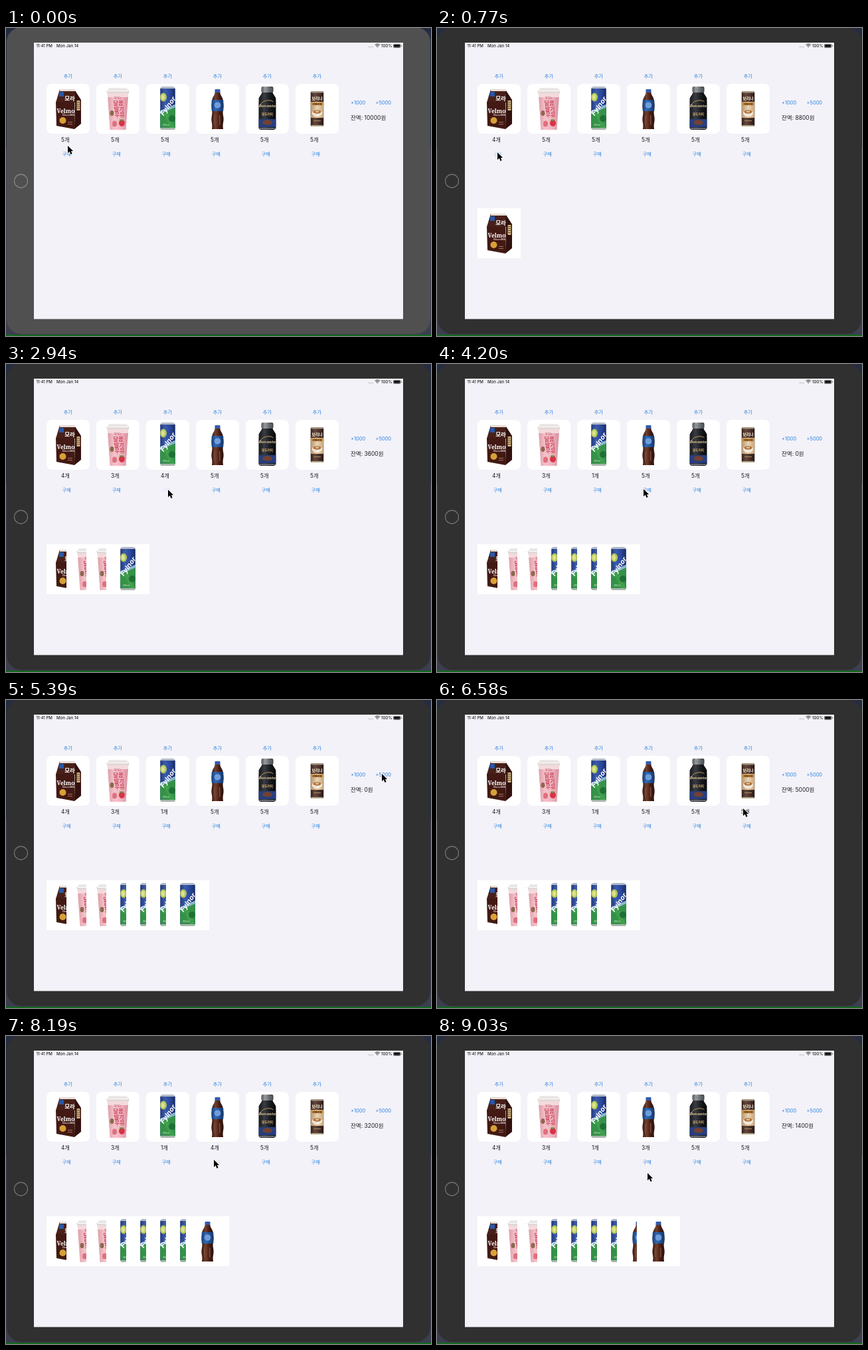
Write an HTML page with a canvas that moves like this. It is 640 by 463 pixels and loops after 9.1 s.

```html
<!DOCTYPE html>
<html lang="ko">
<head>
<meta charset="utf-8">
<title>자판기</title>
<style>
html, body { margin: 0; width: 100%; height: 100%; overflow: hidden; background: #242c42; }
canvas { display: block; width: 100vw; height: 100vh; }
</style>
</head>
<body>
<canvas id="stage"></canvas>
<script>
const W = 640, H = 463, LOOP = 9100, STEP = 70;
const canvas = document.getElementById('stage');
const ctx = canvas.getContext('2d');
const ratio = window.devicePixelRatio || 1;
canvas.width = Math.round(W * ratio);
canvas.height = Math.round(H * ratio);

const SANS = "Inter, 'Noto Sans CJK KR', 'Noto Sans CJK', sans-serif";
const SERIF = "'Noto Serif', serif";
const LINK = '#2b83e2', INK = '#1c1c1e';
const CARD_W = 65, CARD_H = 75, LEFT = 61, MID = CARD_W / 2;
const TAP_DELAY = 280, TAP_GAP = 350, FOCUS = 420, DEPOSIT = 5000;

// Where the pointer goes, when it arrives and what it taps there
const visits = [
  { at: 0, x: 93, y: 177 },
  { at: 350, x: 91, y: 187, item: 0, taps: 1 },
  { at: 1120, x: 162, y: 187, item: 1, taps: 2 },
  { at: 2380, x: 244, y: 189, item: 2, taps: 4 },
  { at: 4200, x: 311, y: 188 },
  { at: 5390, x: 566, y: 111, deposit: true, taps: 1 },
  { at: 6580, x: 461, y: 163 },
  { at: 7840, x: 313, y: 186, item: 3, taps: 2 },
  { at: 9030, x: 317, y: 206 }
];

const taps = visits.flatMap(v => Array.from({ length: v.taps || 0 }, (_, n) => (
  { at: v.at + TAP_DELAY + n * TAP_GAP, item: v.item, deposit: v.deposit }
)));

const smooth = p => {
  const q = Math.max(0, Math.min(1, p));
  return q * q * (3 - 2 * q);
};

function fillPath(fill) {
  ctx.closePath();
  ctx.fillStyle = fill;
  ctx.fill();
}

function poly(points, fill) {
  ctx.beginPath();
  points.forEach(([x, y]) => ctx.lineTo(x, y));
  fillPath(fill);
}

function box(x, y, w, h, fill, r = 0) {
  ctx.beginPath();
  ctx.roundRect(x, y, w, h, r);
  fillPath(fill);
}

// Box centred on the card
const band = (y, w, h, fill, r) => box(MID - w / 2, y, w, h, fill, r);

function oval(x, y, rx, ry, fill) {
  ctx.beginPath();
  ctx.ellipse(x, y, rx, ry, 0, 0, Math.PI * 2);
  fillPath(fill);
}

// Upright symmetric shape whose half width depends on the height
function turned(top, bottom, half, fill) {
  ctx.beginPath();
  for (let y = top; y <= bottom; y++) ctx.lineTo(MID + half(y), y);
  for (let y = bottom; y >= top; y--) ctx.lineTo(MID - half(y), y);
  fillPath(fill);
}

function text(s, x, y, size, fill, style = '', family = SANS, align = 'left') {
  ctx.font = `${style} ${size}px ${family}`;
  ctx.textAlign = align;
  ctx.fillStyle = fill;
  ctx.fillText(s, x, y);
}

const label = (s, y, size, fill, style = 'bold', family = SANS, x = MID) =>
  text(s, x, y, size, fill, style, family, 'center');

// Horizontal gradient that rounds a shape of the given width
function shade(w, ...colors) {
  const g = ctx.createLinearGradient(MID - w / 2, 0, MID + w / 2, 0);
  colors.forEach((c, i) => g.addColorStop(i / (colors.length - 1), c));
  return g;
}

function carton() {
  poly([[20, 8], [43, 9], [43, 28], [14, 28]], '#48201b');
  poly([[43, 10], [52, 24], [52, 60], [42, 68]], '#32110e');
  poly([[14, 27], [42, 28], [42, 68], [15, 63]], '#431913');
  box(20, 8, 23, 3, '#e6ded9');
  box(45.5, 25, 5, 15, '#cdb47c');
  for (let y = 27; y < 39; y += 3) box(46, y, 4, 1, '#67472f');
  box(19, 12, 7, 7, '#2857a5');
  label('모라', 25, 8.5, '#fff', 'bold', SANS, 35);
  label('Velmo', 43.5, 8.5, '#fff', 'bold', SERIF, 29);
  label('Choco Milk', 48, 3.4, '#eadfd5', 'bold', SANS, 33);
  oval(24.5, 55, 5, 5, '#d8a136');
  for (let y = 57; y < 62; y += 3) box(32, y, 7, 1, '#a0715a');
}

function cup() {
  turned(13, 69, y => 15.8 - (y - 13) * 0.068, shade(31, '#dd9eaa', '#f5c3ca', '#f0b3bd', '#d58f9e'));
  turned(13, 20, y => 15.8 - (y - 13) * 0.068, '#f3dadd');
  band(6, 29, 6, '#ebe8e8', 2);
  band(9.5, 34, 4, '#d9d4d4', 2);
  band(10, 31, 1.5, '#fbfafa');
  label('맛있는', 23, 4, '#b4475b', '');
  ['달콤', '딸기', '우유'].forEach((s, i) => label(s, 32 + i * 8.5, 8.2, '#c84660', 'bold', SANS, 33 + i));
  oval(23.5, 44, 3, 4, '#8b6a50');
  oval(38.5, 59, 4.5, 5, '#d53549');
  oval(38, 54.5, 3, 1.2, '#64903e');
  oval(27.5, 60, 3.5, 4.5, '#e0707e');
}

function sodaCan() {
  ctx.save();
  ctx.beginPath();
  ctx.roundRect(MID - 11.3, 4.5, 22.6, 64.5, 4);
  ctx.clip();
  band(4, 23, 66, shade(23, '#24397a', '#3c5cae', '#2b479b', '#172b64'));
  ctx.save();
  ctx.translate(MID, 39);
  ctx.rotate(-0.42);
  box(-20, 0, 40, 50, '#349247');
  box(-20, -3, 40, 4, '#8fb6cd');
  box(-8, 2, 7, 45, '#58b45855');
  ctx.restore();
  oval(26, 20, 5, 6.5, '#b3c65a');
  oval(25.5, 20, 2.6, 4, '#dde28c');
  oval(39, 52, 5, 5, '#1f6f36');
  band(4, 23, 3, '#b9bec6');
  band(66, 23, 3, '#a9b7ac');
  ctx.translate(MID, 33);
  ctx.rotate(-0.95);
  label('Fylnor', 4, 10.5, '#fff', 'italic bold', SANS, 0);
  ctx.restore();
  label('355ml', 63, 3.5, '#d9ebd9', '', SANS, 30);
}

function bottle() {
  const brown = shade(18, '#391711', '#70402c', '#451b13', '#2b100c');
  const half = y => 3.4 + 5.2 * smooth((y - 13) / 11) + 0.5 * Math.cos((y - 33) / 3.2);
  turned(12, 68, half, brown);
  band(8, 8, 5, '#315cae', 1);
  band(24, 17.6, 17, shade(18, '#163d7d', '#3069b4', '#205093', '#143565'), 1);
  oval(MID, 32, 4.8, 4.8, '#6f9bd8');
  for (const x of [27, 35]) box(x, 47, 1.6, 15, '#7a4b37', 1);
}

function coffeeBottle() {
  const steel = shade(19, '#464a4d', '#a4a9aa', '#606467', '#303336');
  const black = shade(26, '#17191f', '#3a3c42', '#17191e', '#08090d');
  turned(12, 24, y => 8 + 5 * smooth((y - 12) / 11), black);
  band(22, 26, 47, black, 4);
  band(4, 18, 9, steel, 2);
  for (let x = -6; x <= 6; x += 3) box(MID + x, 6, 1, 6, '#747a7c');
  ctx.beginPath();
  ctx.ellipse(MID, 32, 11, 7, -0.2, Math.PI, Math.PI * 1.85);
  ctx.strokeStyle = '#b99b5c';
  ctx.lineWidth = 1;
  ctx.stroke();
  label('Dovanta', 35, 5.8, '#ead59d', 'italic bold', SERIF);
  label('원두커피', 47, 4.6, '#d9b376');
  band(53, 25.6, 12, '#263e82');
  oval(MID, 58, 7.5, 4, '#704136');
  band(66, 24, 2, '#6d7178', 1);
}

function coffeeCan() {
  band(11, 19.5, 53, shade(20, '#34201a', '#65483a', '#49302a', '#251611'), 2.5);
  band(11, 18, 2.5, '#a49583', 1);
  label('보리나', 23.5, 6, '#fff4df');
  band(27, 19.5, 24, shade(20, '#b5926e', '#ead4b0', '#c8a47a'));
  band(28, 17.5, 4, '#c48b35');
  label('카페라떼', 31.5, 3.7, '#5a2d1c');
  oval(MID, 44, 7.5, 5, '#f1e9dd');
  oval(MID, 42, 6, 2.7, '#a86e3b');
  oval(MID, 41.8, 3, 1.2, '#e5c18d');
  band(55, 11, 1, '#ad8c6d');
  band(62, 18, 2, '#b8a890', 1);
}

const products = [
  { paint: carton, price: 1200 },
  { paint: cup, price: 2000 },
  { paint: sodaCan, price: 1200 },
  { paint: bottle, price: 1800 },
  { paint: coffeeBottle },
  { paint: coffeeCan }
];

function card(i, x, y, radius) {
  ctx.save();
  ctx.translate(x, y);
  box(0, 0, CARD_W, CARD_H, '#fff', radius);
  products[i].paint();
  ctx.restore();
}

// A tapped label dims, then fades back in
function dim(t, matches) {
  return Math.min(1, ...taps.filter(matches).map(tap => {
    const d = t - tap.at;
    return d < -70 ? 1 : 0.15 + 0.85 * smooth((d - 70) / 210);
  }));
}

function link(s, x, y, size, alpha = 1) {
  ctx.globalAlpha = alpha;
  text(s, x, y, size, LINK);
  ctx.globalAlpha = 1;
}

function device(t) {
  const active = t >= FOCUS;
  box(0, 0, W, 180, '#242c42');
  box(0, 180, W, H - 180, '#3b3f50');
  box(1, -1, 638, 461, active ? '#303030' : '#505050', 22);
  box(0, 461, W, 2, '#13681e');
  ctx.beginPath();
  ctx.arc(22.5, 230, 10, 0, Math.PI * 2);
  ctx.strokeStyle = active ? '#707070' : '#858585';
  ctx.lineWidth = 1.3;
  ctx.stroke();
  box(42, 22, 556, 415.5, '#f3f2f8');
}

function statusBar() {
  const status = (s, x) => text(s, x, 29.2, 6.1, '#222', '500');
  status('11:41 PM', 45.5);
  status('Mon Jan 14', 76);
  status('100%', 565);
  for (let i = 0; i < 4; i++) oval(546 + i * 2.1, 28.5, 0.6, 0.6, '#888');
  ctx.strokeStyle = '#222';
  ctx.lineWidth = 1;
  for (let r = 1.2; r < 6; r += 2) {
    ctx.beginPath();
    ctx.arc(559.3, 29.3, r, -Math.PI * 0.75, -Math.PI * 0.25);
    ctx.stroke();
  }
  ctx.beginPath();
  ctx.roundRect(583.3, 24.3, 10.8, 5.2, 1.4);
  ctx.lineWidth = 0.6;
  ctx.stroke();
  box(584.1, 25.1, 9.2, 3.6, '#111', 0.7);
  box(594.8, 26, 0.9, 1.8, '#444', 0.4);
}

function pointerAt(t) {
  const k = Math.max(0, visits.findLastIndex(v => t >= v.at));
  const from = visits[k], to = visits[k + 1] || from;
  const leave = from.at + (from.taps ? TAP_DELAY + from.taps * TAP_GAP : 0);
  const e = to === from ? 0 : smooth((t - leave) / (to.at - leave));
  return [from.x + (to.x - from.x) * e, from.y + (to.y - from.y) * e];
}

function pointer(t) {
  ctx.save();
  ctx.translate(...pointerAt(t));
  ctx.lineJoin = 'round';
  for (const [color, edge] of [['#fff', 1.8], ['#000', 0]]) {
    ctx.strokeStyle = color;
    ctx.lineWidth = 2.2 + edge;
    ctx.beginPath();
    ctx.moveTo(3, 6.5);
    ctx.lineTo(5.6, 12.5);
    ctx.stroke();
    poly([[0, 0], [0, 11.3], [3.1, 8.3], [8.1, 8.1]], color);
    ctx.lineWidth = edge;
    if (edge) ctx.stroke();
  }
  ctx.restore();
}

function draw(t) {
  ctx.setTransform(canvas.width / W, 0, 0, canvas.height / H, 0, 0);
  const done = taps.filter(tap => t >= tap.at);
  const sold = done.filter(tap => !tap.deposit).map(tap => tap.item);
  const money = done.reduce((sum, tap) => sum + (tap.deposit ? DEPOSIT : -products[tap.item].price), 10000);
  device(t);
  statusBar();
  products.forEach((_, i) => {
    const x = LEFT + i * 75;
    link('추가', x + 25.7, 74.8, 7.2);
    card(i, x, 84, 8);
    text(`${5 - sold.filter(item => item === i).length}개`, x + 22, 171, 8.3, INK);
    link('구매', x + 23.7, 192, 7.2, dim(t, tap => tap.item === i));
  });
  link('+1000', 519, 115, 7.5);
  link('+5000', 556.5, 115, 7.5, dim(t, tap => tap.deposit));
  text(`잔액: ${money}원`, 519, 138.4, 8.5, INK);
  sold.forEach((item, n) => card(item, LEFT + n * 30, 271, 0));
  pointer(t);
}

const start = performance.now();
function tick() {
  const t = (performance.now() - start) % LOOP;
  draw(Math.floor(t / STEP) * STEP);
  requestAnimationFrame(tick);
}
tick();
</script>
</body>
</html>
```
